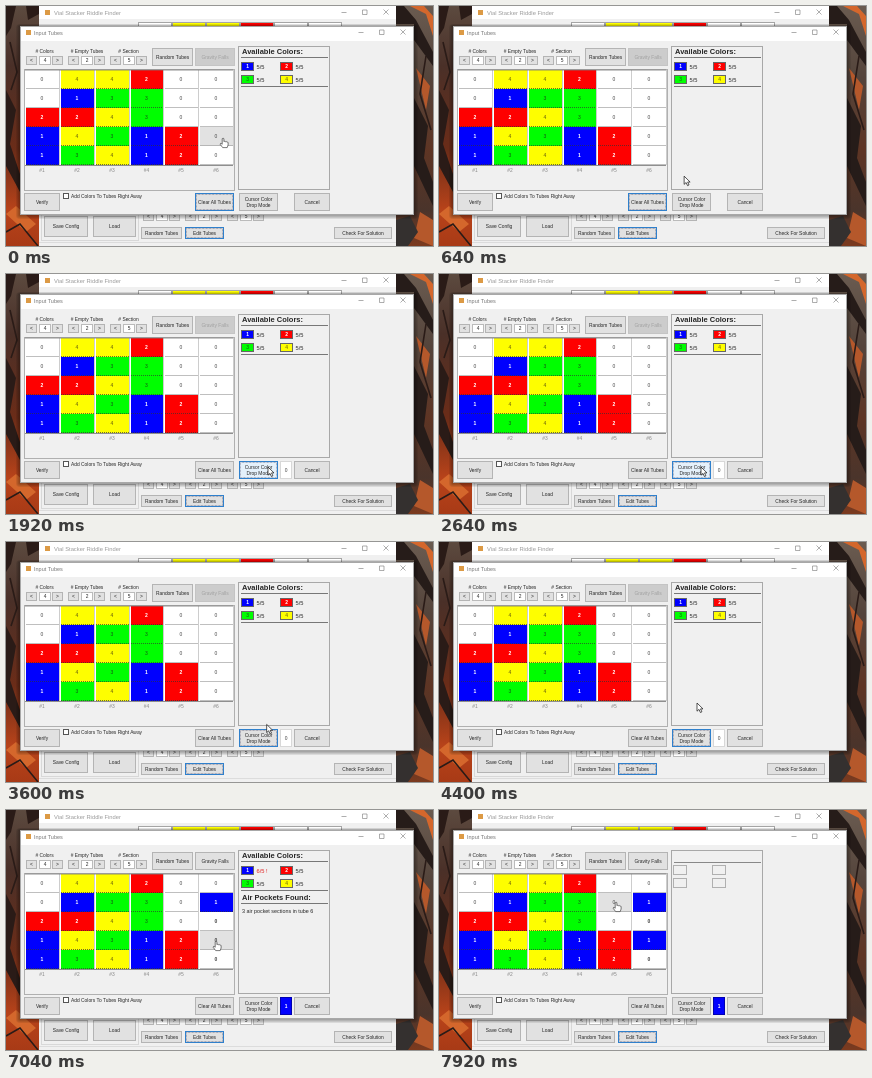
Animation of 427 by 240 pixels, one loop 8000 ms. Source, as an HTML page:

```html
<!DOCTYPE html>
<html lang="en">
<head>
<meta charset="utf-8">
<title>Input Tubes</title>
<style>
  html, body { margin: 0; width: 100%; height: 100%; overflow: hidden; background: #241815; }
  svg { display: block; width: 100vw; height: 100vh; }
  text { font-family: "Liberation Sans", Arial, sans-serif; white-space: pre; }
</style>
</head>
<body>
<svg id="stage" viewBox="0 0 427 240">
  <defs>
    <linearGradient id="leftTone" x2="0" y2="1">
      <stop offset="0" stop-color="#5c4a3f"/>
      <stop offset=".25" stop-color="#4a3028"/>
      <stop offset=".6" stop-color="#6b2c18"/>
      <stop offset=".85" stop-color="#b8431a"/>
      <stop offset="1" stop-color="#a83a16"/>
    </linearGradient>
    <linearGradient id="rightTone" x2="0" y2="1">
      <stop offset="0" stop-color="#6a5b50"/>
      <stop offset=".3" stop-color="#54443b"/>
      <stop offset=".6" stop-color="#5e3524"/>
      <stop offset=".85" stop-color="#4a342b"/>
      <stop offset="1" stop-color="#7c3a1e"/>
    </linearGradient>
  </defs>
  <g id="back"></g>
  <g id="dialog"></g>
  <g id="pointer"></g>
</svg>
<script>
const LOOP = 8000;
const DROP_MODE_AT = 1920, PICK_AT = 5680, FILL_AT = 6400, SECOND_FILL_AT = 7600, REFRESH = 240;
const INK = '#262626', FACE = '#f0f0f0', BUTTON = '#e1e1e1', EDGE = '#b4b4b4', ACCENT = '#2f80cc';
const COLORS = ['#ffffff', '#0000fe', '#fe0000', '#00fe00', '#fefe00'];
const INKS = ['#444', '#fff', '#fff', '#165016', '#5c5210'];
const ROWS = ['044200', '013300', '224300', '143120', '134120'];
const COL_X = [19, 54, 89, 124, 158, 193, 228];
const ROW_Y = [64, 83, 102, 121, 140, 159];
const SWATCHES = [[1, 235, 56], [2, 274, 56], [3, 235, 69], [4, 274, 69]];

// Pointer stops: time, x, y
const STOPS = [
  [0, 217, 132], [80, 217, 132], [1040, 262, 193], [3200, 262, 193], [4240, 258, 161],
  [4480, 258, 161], [5520, 243, 56], [5800, 243, 56], [6280, 208, 91], [6520, 208, 91],
  [6940, 210, 131], [7600, 210, 131], [7880, 177, 92], [LOOP, 177, 92]
];

const byId = id => document.getElementById(id);

function box(x, y, w, h, fill, stroke) {
  return stroke
    ? `<rect x="${x + .5}" y="${y + .5}" width="${w - 1}" height="${h - 1}" fill="${fill}" stroke="${stroke}"/>`
    : `<rect x="${x}" y="${y}" width="${w}" height="${h}" fill="${fill}"/>`;
}

function path(d, fill, stroke = 'none', width = 1, extra = '') {
  return `<path d="${d}" fill="${fill}" stroke="${stroke}" stroke-width="${width}" ${extra}/>`;
}

function label(s, x, y, { size = 4.9, fill = INK, anchor = 'start', bold = false } = {}) {
  const safe = s.replace(/</g, '&lt;').replace(/>/g, '&gt;');
  return `<text x="${x}" y="${y}" font-size="${size}" fill="${fill}" text-anchor="${anchor}" font-weight="${bold ? 700 : 400}">${safe}</text>`;
}

const centered = (s, x, y, options) => label(s, x, y, { anchor: 'middle', ...options });

function button(s, x, y, w, h, { hover = false, focus = false, disabled = false } = {}) {
  const fill = disabled ? '#cccccc' : hover ? '#e5f1fb' : BUTTON;
  const lines = s.split('\n');
  const firstY = y + h / 2 + 1.8 - (lines.length - 1) * 3;
  let out = box(x, y, w, h, fill, focus || hover ? ACCENT : disabled ? '#c4c4c4' : EDGE);
  if (focus) out += `<rect x="${x + 1.5}" y="${y + 1.5}" width="${w - 3}" height="${h - 3}" fill="none" stroke="#446" stroke-width=".5" stroke-dasharray=".7 .7"/>`;
  lines.forEach((line, i) => out += centered(line, x + w / 2, firstY + i * 6, { fill: disabled ? '#a0a0a0' : INK }));
  return out;
}

function spinner(value, x, y) {
  return button('<', x, y, 11, 9) + box(x + 13, y, 12, 9, '#fff', '#bbb') +
    centered(value, x + 19, y + 6.3) + button('>', x + 26, y, 11, 9);
}

function windowControls(x, y) {
  return path(`M${x - 2.5} ${y + .5}h5M${x + 18.5} ${y - 2}h4.5v4.5h-4.5zM${x + 39.5} ${y - 2.5}l5 5m0-5l-5 5`, 'none', '#777', .6);
}

function wallpaper() {
  return box(0, 0, 34, 240, 'url(#leftTone)') + box(389, 0, 38, 240, 'url(#rightTone)') +
    path('M0 0H10L5 22L0 30ZM20 0H33V8L22 14ZM0 84L10 104L4 138L14 168V186L0 160Z', '#2a1b17') +
    path('M0 208L10 200L30 218L20 226ZM404 0L420 8L427 30V10L418 0Z', '#d4672c') +
    path('M390 0H398L410 14L427 46V60L408 34V18H390ZM408 92L422 120L418 152L427 176V200L408 160Z', '#261c19') +
    path('M410 62L424 80L420 104ZM414 206L427 214V240L408 232Z', '#b5582b') +
    path('M390 214L404 210L412 226L402 240H390Z', '#34302f') +
    path('M0 226L14 218L32 240M4 36L11 66L5 84M420 50L414 88L425 124', 'none', '#2a1b17', 1.6);
}

function mainWindow() {
  let out = box(33, 0, 357, 240, FACE) + box(33, 0, 357, 13, '#fff') +
    box(39, 4, 5, 5, '#dc9a45') + label('Vial Stacker Riddle Finder', 48, 9, { size: 5.8, fill: '#9a9a9a' }) +
    windowControls(338, 6);
  [0, 4, 4, 2, 0, 0].forEach((c, i) => out += box(132 + i * 34, 16, 34, 8, COLORS[c], '#a5a5a5'));
  out += box(35, 206, 98, 29, 'none', '#d8d8d8') +
    button('Save Config', 38, 210, 44, 21) + button('Load', 87, 210, 43, 21) +
    spinner('4', 137, 206) + spinner('2', 179, 206) + spinner('5', 221, 206) +
    button('Random Tubes', 135, 221, 41, 12) + button('Edit Tubes', 179, 221, 39, 12, { focus: true }) +
    button('Check For Solution', 328, 221, 58, 12) + box(33, 236, 357, 1, '#dcdcdc');
  return out;
}

function dialogFrame() {
  let shadow = '';
  for (let i = 4; i > 0; i--) {
    shadow += `<rect x="${14 - i}" y="${20 - i / 2}" width="${394 + 2 * i}" height="${189 + 1.5 * i}" rx="${i}" opacity=".09"/>`;
  }
  return shadow + box(14, 20, 394, 189, FACE, '#a8a8a8') + box(15, 21, 392, 14, '#fff') +
    box(20, 24, 5, 5, '#dc9a45') + label('Input Tubes', 28, 28.8, { size: 5.5, fill: '#777' }) + windowControls(355, 26) +
    centered('# Colors', 38.5, 47) + centered('# Empty Tubes', 81, 47) + centered('# Section', 122.5, 47) +
    spinner('4', 20, 50) + spinner('2', 62, 50) + spinner('5', 104, 50) +
    button('Random Tubes', 146, 42, 41, 18) + button('Verify', 18, 187, 36, 18) +
    box(57, 187, 6, 6, '#fff', '#555') + label('Add Colors To Tubes Right Away', 65, 192.2) +
    button('Cancel', 288, 187, 36, 18);
}

function tubeGrid(state) {
  let out = box(18, 63, 211, 122, FACE, '#b0b0b0');
  ROWS.forEach((row, r) => [...row].forEach((digit, c) => {
    const x = COL_X[c], y = ROW_Y[r], w = COL_X[c + 1] - x, h = ROW_Y[r + 1] - y;
    const added = c === 5 && (state.filled && r === 1 || state.filledTwice && r === 3);
    const value = added ? 1 : +digit;
    const fill = !value && state.cell === r * 6 + c ? '#e2e2e2' : COLORS[value];
    const pocket = state.filled && c === 5 && r > 1;
    out += box(x, y, w, h, '#fff') + box(x + 1, y, w - 2, h, fill) + box(x + w - 1, y, 1, h, '#cdcdcd') +
      path(`M${x + 1} ${y + h - .5}h${w - 2}`, 'none', value ? '#333' : '#a4a4a4', .7, value ? 'stroke-dasharray="1 1"' : '') +
      centered(String(value), x + w / 2 - .5, y + 11.2, { fill: INKS[value], size: 5, bold: pocket || value === 1 || value === 2 });
  }));
  out += path('M19 64h208M19 159.5h208', 'none', '#777', .8);
  for (let c = 0; c < 6; c++) out += centered('#' + (c + 1), (COL_X[c] + COL_X[c + 1]) / 2 - .5, 165.7, { fill: '#858585' });
  return out;
}

function colorPanel(state) {
  let out = box(232, 40, 92, 144, FACE, '#a8a8a8');
  if (state.refreshing) {
    SWATCHES.forEach(([, x, y]) => out += box(x - 1, y - 1, 14, 10, FACE, '#b0b0b0'));
    return out + box(235, 52, 87, 1, '#888');
  }
  out += label('Available Colors:', 236, 47.7, { size: 7.5, bold: true }) + box(235, 51, 87, 1, '#777');
  SWATCHES.forEach(([n, x, y]) => {
    const over = state.filled && n === 1;
    out += box(x, y, 13, 9, COLORS[n], '#666') + centered(String(n), x + 6.5, y + 6.3, { fill: INKS[n], bold: n < 3 }) +
      label(over ? '6/5 !' : '5/5', x + 15.5, y + 6.5, { size: 5.7, fill: over ? '#e02020' : INK });
  });
  out += box(235, 80, 87, 1, '#777');
  if (state.filled) {
    out += label('Air Pockets Found:', 236, 90, { size: 7.5, bold: true }) + box(235, 93, 87, 1, '#777') +
      label('3 air pocket sections in tube 6', 236, 103, { size: 5.4 });
  }
  return out;
}

function drawDialog(state) {
  const held = state.picked ? 1 : 0;
  return dialogFrame() + tubeGrid(state) + colorPanel(state) +
    button('Gravity Falls', 189, 42, 40, 18, { disabled: !state.filled }) +
    button('Clear All Tubes', 189, 187, 39, 18, { focus: !state.dropMode }) +
    button('Cursor Color\nDrop Mode', 233, 187, 39, 18, { hover: state.onDrop, focus: state.dropMode && !state.filled }) +
    (state.dropMode ? box(274, 187, 12, 18, COLORS[held], held ? '#0000b0' : '#d8d8d8') +
      centered(String(held), 280, 198, { fill: INKS[held], bold: !!held }) : '');
}

function pointerAt(t) {
  const i = STOPS.findIndex((stop, k) => k > 0 && t < stop[0]);
  const [t0, x0, y0] = STOPS[i - 1], [t1, x1, y1] = STOPS[i];
  const p = (t - t0) / (t1 - t0), e = p * p * (3 - 2 * p);
  return [x0 + (x1 - x0) * e, y0 + (y1 - y0) * e];
}

function cellAt(x, y) {
  if (x < 19 || x >= 228 || y < 64 || y >= 159) return -1;
  return ROW_Y.findLastIndex(v => v <= y) * 6 + COL_X.findLastIndex(v => v <= x);
}

const ARROW = path('M0 0V8.2L2 6.4L3.4 9.5L4.9 8.8L3.5 5.9H6Z', '#fff', '#111', .7);
const HAND = path('M-.8 .7Q0-.6 .9 .7V3.6Q1.7 2.9 2.4 3.7Q3.2 3.1 3.9 4Q4.9 3.7 5.1 4.8V7L4.2 9.6H-.3L-2.8 6.3Q-2.8 4.9-1.6 5.6L-.8 6.3Z', '#fff', '#222', .6);

byId('back').innerHTML = wallpaper() + mainWindow();
let lastKey = '';

function tick(now) {
  const t = now % LOOP, [x, y] = pointerAt(t);
  const cell = cellAt(x, y);
  const onSwatch = SWATCHES.some(([, sx, sy]) => x >= sx && x <= sx + 13 && y >= sy - 1 && y <= sy + 9);
  const state = {
    cell,
    onDrop: x >= 233 && x < 272 && y >= 187 && y < 205,
    dropMode: t >= DROP_MODE_AT,
    picked: t >= PICK_AT,
    filled: t >= FILL_AT,
    filledTwice: t >= SECOND_FILL_AT,
    refreshing: t >= SECOND_FILL_AT || (t >= FILL_AT && t < FILL_AT + REFRESH)
  };
  const key = JSON.stringify(state);
  if (key !== lastKey) {
    byId('dialog').innerHTML = drawDialog(state);
    lastKey = key;
  }
  byId('pointer').innerHTML = cell >= 0 || onSwatch ? HAND : ARROW;
  byId('pointer').setAttribute('transform', `translate(${x.toFixed(2)} ${y.toFixed(2)})`);
  requestAnimationFrame(tick);
}
tick(performance.now());
</script>
</body>
</html>
```
